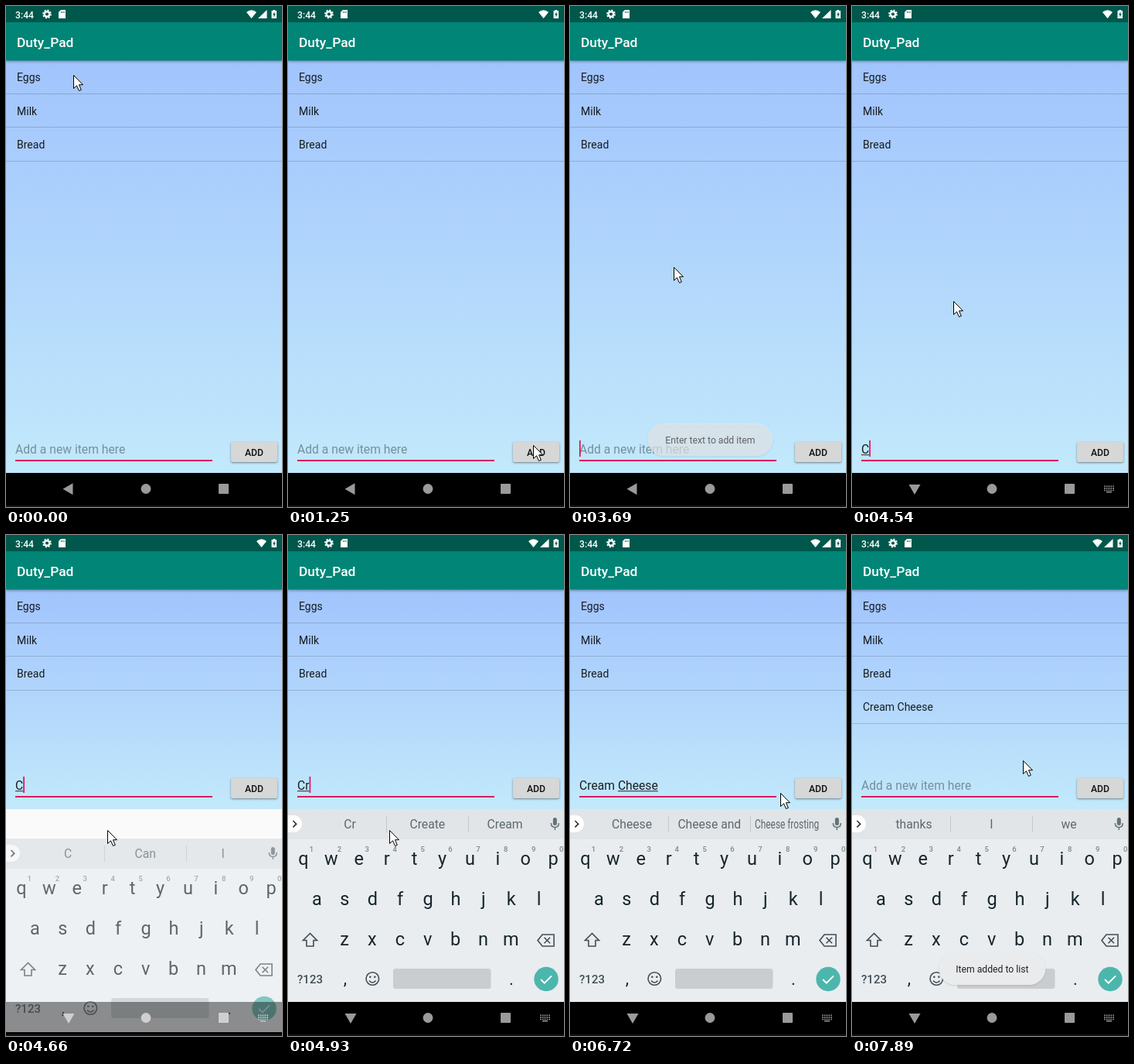
Write an HTML page with a canvas that moves like this. It is 357 px wide and 647 px high and loops after 8000 ms.

```html
<!DOCTYPE html>
<html lang="en">
<head>
<meta charset="utf-8">
<title>Shopping list</title>
<style>
html, body { margin: 0; height: 100%; overflow: hidden; background: #000; }
canvas { display: block; width: 357px; height: 647px; }
</style>
</head>
<body>
<canvas id="stage" width="357" height="647"></canvas>
<script>
const ctx = document.getElementById('stage').getContext('2d');
const LOOP = 8000;

// Screen refreshes: [first, last, count]
const frames = [0];
for (const [a, b, n] of [[120, 660, 5], [970, 970, 1], [1250, 1250, 1], [1680, 2640, 8], [3040, 3160, 2],
  [3690, 4660, 8], [4810, 5750, 8], [5900, 5900, 1], [6170, 6170, 1], [6450, 7470, 9], [7590, 7890, 3]])
  for (let i = 0; i < n; i++) frames.push(a + (n > 1 ? (b - a) * i / (n - 1) : 0));

// Pointer path: [time, x, y]
const path = [[0, 87, 89], [660, 316, 563], [960, 316, 563], [970, 317, 567], [1670, 317, 567], [1680, 315, 557],
  [2150, 315, 557], [2640, 133, 306], [3030, 133, 306], [3160, 134, 335], [3680, 134, 335], [3960, 131, 381],
  [6330, 131, 381], [6705, 272, 333], [6960, 316, 325], [7230, 316, 325], [7590, 250, 299], [7720, 221, 291],
  [LOOP, 221, 291]];

// Typing: [time, text, suggestions]
const typed = [
  [0, '', []],
  [4370, 'C', ['C', 'Can', 'I']],
  [4800, 'Cr', ['Cr', 'Create', 'Cream']],
  [4930, 'Cre', ['Cre', 'Cream', 'Create']],
  [5070, 'Crea', ['Crea', 'Cream', 'Create']],
  [5200, 'Cream', ['Cream', 'Creamy', 'Creams']],
  [5340, 'Cream ', ['cheese', 'and', 'of']],
  [5470, 'Cream C', ['C', 'Cheese', 'Can']],
  [5605, 'Cream Ch', ['Ch', 'Cheese', 'Cheese and']],
  [5740, 'Cream Che', ['Che', 'Cheese', 'Cheese and']],
  [5890, 'Cream Chee', ['Chee', 'Cheese', 'Cheese and']],
  [6160, 'Cream Cheese', ['Cheese', 'Cheese and', 'Cheese frosting']],
  [7200, '', ['thanks', 'I', 'we']]
];
const caretOn = [[390, 1250], [1680, 2250], [2640, 3040], [3690, 6700], [7200, 7590]];
const noSignal = [[1250, 2300], [3900, 4800], [7050, 7590]];
const pressed = [[1680, 1900], [7070, 7200]];

const during = (spans, t) => spans.some(([a, b]) => t >= a && t < b);
const clamp = v => Math.max(0, Math.min(1, v));
const fade = (t, from, to) => clamp((t - from) / 270) * clamp(1 - (t - to) / 270);

function rect(x, y, w, h, color, r = 0) {
  ctx.fillStyle = color;
  ctx.beginPath();
  ctx.roundRect(x, y, w, h, r);
  ctx.fill();
}
function shape(d, color) {
  ctx.fillStyle = color;
  ctx.fill(new Path2D(d));
}
function line(d, color, width = 1) {
  ctx.strokeStyle = color;
  ctx.lineWidth = width;
  ctx.stroke(new Path2D(d));
}
function circle(x, y, r, color, width) {
  ctx.beginPath();
  ctx.arc(x, y, r, 0, 7);
  ctx.fillStyle = ctx.strokeStyle = color;
  ctx.lineWidth = width || 1;
  width ? ctx.stroke() : ctx.fill();
}
function text(s, x, y, size, color, weight = 400, align = 'left', max) {
  ctx.font = `${weight} ${size}px Roboto, sans-serif`;
  ctx.textAlign = align;
  ctx.fillStyle = color;
  ctx.fillText(s, x, y, max);
}
function shadow(color, blur, dy) {
  ctx.shadowColor = color;
  ctx.shadowBlur = blur;
  ctx.shadowOffsetY = dy;
}
const noShadow = () => shadow('transparent', 0, 0);

function header(t) {
  shadow('rgba(0,0,0,.3)', 3, 1);
  rect(0, 21, 357, 49.5, '#008577');
  noShadow();
  rect(0, 0, 357, 21, '#00574b');
  text('Duty_Pad', 14, 52.5, 17.4, '#fff', 500);

  text('3:44', 12, 15.5, 12.2, '#fff', 500);
  circle(53, 10.5, 3.3, '#fff', 2.4);
  ctx.setLineDash([2, 1.9]);
  circle(53, 10.5, 5, '#fff', 1.8);
  ctx.setLineDash([]);
  shape('M71 5H77V16H68V8Z', '#fff');
  line('M71.5 7V9M73.3 7V9M75.2 7V9', '#00574b', .8);
  const signal = !during(noSignal, t);
  ctx.save();
  if (!signal) ctx.translate(13, 0);
  shape('M311 8Q317.5 2.6 324 8L317.5 16Z', '#fff');
  ctx.restore();
  if (signal) shape('M337.5 5V16H326Z', '#fff');
  shape('M345.5 5H348V6H350V16H343.5V6H345.5Z', '#fff');
  shape('M347.4 7.5L345 11.5H346.5V14.5L348.8 10.3H347.4Z', '#00574b');
}

function list(bottom, items) {
  const g = ctx.createLinearGradient(0, 70, 0, bottom);
  g.addColorStop(0, '#a1c4fd');
  g.addColorStop(1, '#c2e9fb');
  rect(0, 70, 357, bottom - 70, g);
  items.forEach((s, i) => {
    const y = i * 43.3;
    text(s, 14, 97.3 + y, 14, 'rgba(0,0,0,.87)');
    rect(0, Math.round(113 + y), 357, 1, 'rgba(0,0,0,.16)');
  });
}

function inputRow(t, bottom, value) {
  const base = bottom - 25.5;
  if (!value) text('Add a new item here', 12, base, 15.7, 'rgba(0,0,0,.38)');
  text(value, 12, base, 15.7, 'rgba(0,0,0,.87)');
  const end = 12 + ctx.measureText(value).width;
  const start = 12 + ctx.measureText(value.slice(0, value.lastIndexOf(' ') + 1)).width;
  rect(start, base + 1.7, end - start, 1, '#222');
  if (during(caretOn, t)) rect(end, bottom - 42, 1.8, 21, '#d81b60');
  rect(12, bottom - 17, 255, 2, '#d81b60');

  const down = during(pressed, t);
  shadow('rgba(0,0,0,.45)', down ? 6 : 2.5, down ? 3 : 1);
  rect(291, bottom - 40, 60, 26, down ? '#c4c6c6' : '#d6d7d7', 2);
  noShadow();
  text('ADD', 321, bottom - 22, 12.2, '#111', 500, 'center');
}

function keyRow(keys, x, y) {
  [...keys].forEach((k, i) => text(k, x + i * 35.9, y, 23.5, '#17252b', 400, 'center'));
}

function keyboard(words) {
  const ink = '#424e54';
  rect(0, 354, 357, 249, '#e9edf0');
  rect(0, 354, 357, 39, '#e1e5e8');
  rect(-12, 362, 30, 22, '#fff', 11);
  line('M6.5 369L10.7 373.2L6.5 377.4', '#333', 1.7);
  rect(127, 363, 1, 21, '#c3c8cb');
  rect(233, 363, 1, 21, '#c3c8cb');
  words.forEach((w, i) => text(w, 80 + i * 100.3, 379, 15.7, '#5d686e', 400, 'center', 83));
  rect(342.8, 365, 5, 10, '#657177', 2.5);
  line('M340.3 372Q340.3 377.5 345.3 377.5Q350.3 377.5 350.3 372M345.3 377V381', '#657177', 1.5);

  keyRow('qwertyuiop', 20, 426);
  keyRow('asdfghjkl', 37.5, 478);
  keyRow('zxcvbnm', 73, 530);
  [...'1234567890'].forEach((d, i) => text(d, 30.5 + i * 35.9, 408.5, 9.5, '#7c878c', 500, 'center'));

  line('M28.5 514.5L19.5 523.5H24V531H33V523.5H37.5Z', ink, 1.6);
  line('M329 516H344V531H329L323 523.5ZM331.5 519.8L339 527.2M339 519.8L331.5 527.2', ink, 1.6);

  text('?123', 28.5, 578.5, 15, ink, 500, 'center');
  text(',', 74, 580, 22, '#17252b', 400, 'center');
  text('.', 289, 581, 22, '#17252b', 400, 'center');
  circle(109.3, 573, 8.3, ink, 1.6);
  circle(106.3, 570.7, 1.3, ink);
  circle(112.3, 570.7, 1.3, ink);
  line('M105 575.5Q109.3 580.5 113.6 575.5', ink, 1.6);
  rect(136, 560, 126.5, 26, '#c9cdd0', 3);
  circle(334, 573.5, 15.7, '#4db6ac');
  line('M327 574L331.7 578.7L341 569.3', '#fff', 1.9);
}

function navBar(ime, sliding) {
  if (sliding) {
    rect(0, 603, 357, 39, 'rgba(0,0,0,.42)');
    rect(0, 642, 357, 5, '#000');
  } else rect(0, 603, 357, 44, '#000');
  rect(0, 645, 357, 2, '#171316');
  const c = sliding ? '#cfcfcf' : '#9a9a9a';
  shape(ime ? 'M73.5 618H88.5L81 631Z' : 'M73.5 623.7L86.5 616.2V631.2Z', c);
  circle(181, 623.5, 6.4, c);
  rect(275, 617, 13, 13, c, 1);
  if (ime) {
    for (let y = 0; y < 3; y++)
      for (let x = 0; x < 5; x++) rect(326 + x * 2.8, 619.5 + y * 2.6, 1.7, 1.6, c);
    rect(329, 627, 7, 1.4, c);
  }
}

function toast(s, width, alpha) {
  if (!alpha) return;
  ctx.globalAlpha = alpha;
  shadow('rgba(0,0,0,.12)', 2, 1);
  rect(181.3 - width / 2, 539, width, 42, '#e9ebec', 21);
  noShadow();
  text(s, 181.3, 565, 12.2, '#222', 400, 'center');
  ctx.globalAlpha = 1;
}

function pointer(t) {
  const i = Math.max(1, path.findIndex(p => p[0] >= t));
  const [t0, x0, y0] = path[i - 1], [t1, x1, y1] = path[i];
  const k = clamp((t - t0) / (t1 - t0));
  ctx.save();
  ctx.translate(Math.round(x0 + (x1 - x0) * k) + .5, Math.round(y0 + (y1 - y0) * k) + .5);
  const arrow = 'M0 0V17L4 13.3L7 20L9.8 18.8L7 12.2H12Z';
  shape(arrow, '#fff');
  line(arrow, '#000');
  ctx.restore();
}

function draw(time) {
  const t = frames.findLast(f => f <= time + .01);
  const [, value, words] = typed.findLast(s => s[0] <= t);
  const open = t > 4650, sliding = open && t < 4800;
  const bottom = open ? 354 : 603;
  const items = ['Eggs', 'Milk', 'Bread'];
  if (t >= 7200) items.push('Cream Cheese');

  rect(0, 0, 357, 647, '#fafafa');
  list(bottom, items);
  header(t);
  inputRow(t, bottom, value);
  if (open) {
    ctx.save();
    if (sliding) {
      ctx.translate(0, 38);
      ctx.globalAlpha = .68;
    }
    keyboard(words);
    ctx.restore();
  }
  navBar(t > 4100, sliding);
  toast('Enter text to add item', 162, fade(t, 1900, 3600));
  toast('Item added to list', 138, fade(t, 7250, LOOP));
  pointer(t);
}

function tick() {
  draw(performance.now() % LOOP);
  requestAnimationFrame(tick);
}
tick();
</script>
</body>
</html>
```
